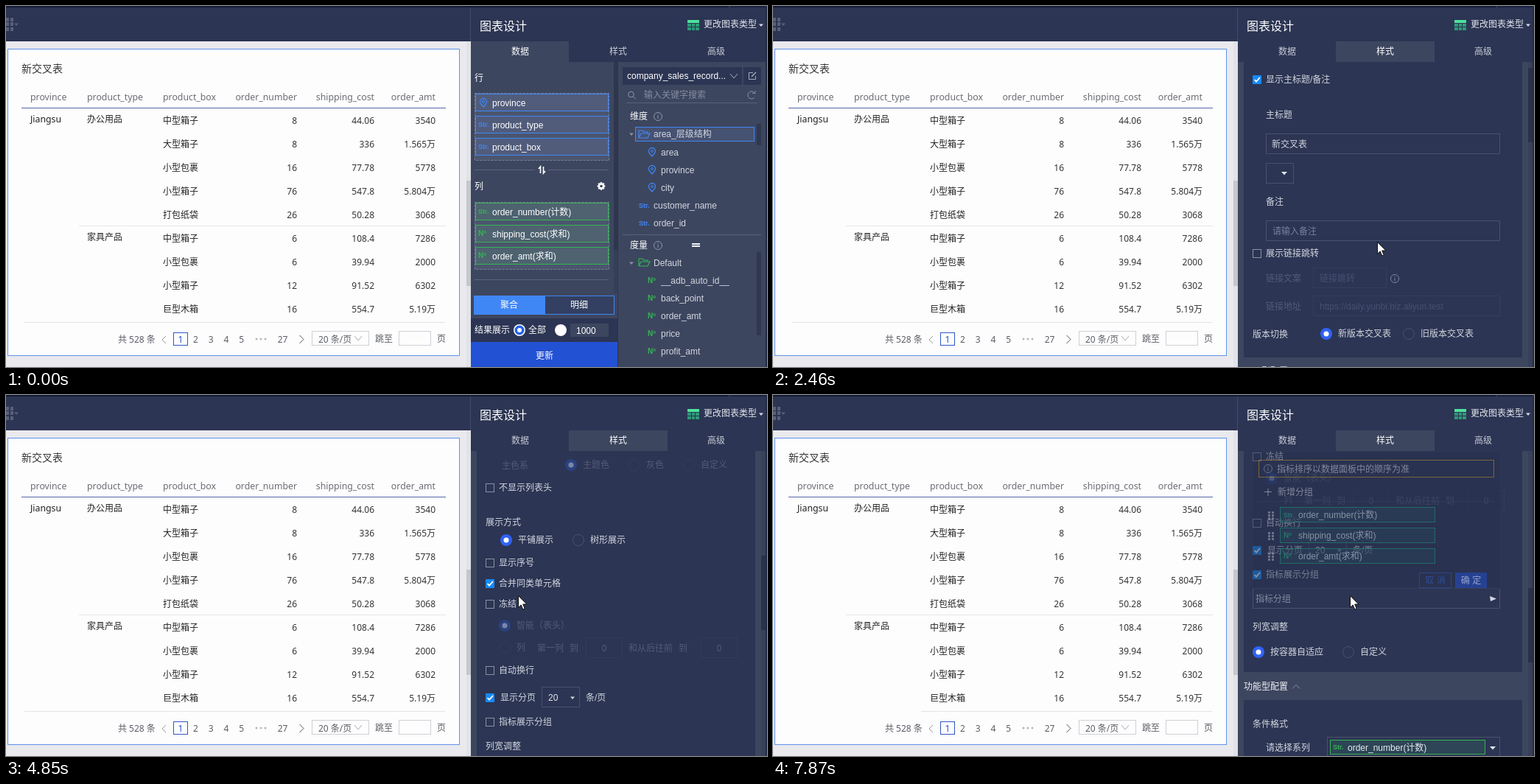
These frames come from a looping animation (1033x490 px, 8000 ms). An HTML page with a canvas:

```html
<!DOCTYPE html>
<html lang="zh-CN">
<head>
<meta charset="utf-8">
<title>图表设计</title>
<style>
html, body { margin: 0; width: 100%; height: 100%; overflow: hidden; background: #2c3553; }
canvas { display: block; width: 1033px; height: 490px; }
</style>
</head>
<body>
<canvas id="stage" width="1033" height="490"></canvas>
<script>
const ctx = document.getElementById('stage').getContext('2d');
const LOOP = 8000;
const UI = '"Liberation Sans", "Noto Sans CJK SC", "Noto Sans CJK", sans-serif';
const DOC = '"Noto Sans", "Noto Sans CJK SC", "Noto Sans CJK", sans-serif';
const NAVY = '#2c3553', SLATE = '#3d465f', BLUE = '#3f87f5', GREEN = '#34b552';
const SOFT = '#d3d7e0', DIM = '#525b76', EDGE = '#48516c';

// ---- drawing helpers ----
function text(s, x, y, color = SOFT, o = {}) {
  const size = o.size || 12;
  ctx.font = `${o.weight || 400} ${size}px ${o.font || UI}`;
  ctx.textAlign = o.align || 'left';
  ctx.fillStyle = color;
  ctx.fillText(s, x, Math.round(y + size * 0.36));
}
function fill(x, y, w, h, color) {
  ctx.fillStyle = color;
  ctx.fillRect(x, y, w, h);
}
function frame(x, y, w, h, color, bg) {
  if (bg) fill(x, y, w, h, bg);
  ctx.strokeStyle = color;
  ctx.lineWidth = 1;
  ctx.strokeRect(x + 0.5, y + 0.5, w - 1, h - 1);
}
function disc(x, y, r, color, line) {
  ctx.beginPath();
  ctx.arc(x, y, r, 0, 7);
  if (color) { ctx.fillStyle = color; ctx.fill(); }
  if (line) { ctx.strokeStyle = line; ctx.lineWidth = 1; ctx.stroke(); }
}
function path(pts, color, width = 1) {
  ctx.beginPath();
  for (let i = 0; i < pts.length; i += 2) ctx.lineTo(pts[i], pts[i + 1]);
  ctx.strokeStyle = color;
  ctx.lineWidth = width;
  ctx.stroke();
}
function shape(pts, color) {
  ctx.beginPath();
  for (let i = 0; i < pts.length; i += 2) ctx.lineTo(pts[i], pts[i + 1]);
  ctx.fillStyle = color;
  ctx.fill();
}
const down = (x, y, r, color) => shape([x - r, y - r / 2, x + r, y - r / 2, x, y + r / 2 + 0.5], color);
const chevron = (x, y, r, d, color) => path([x - r, y - d / 2, x, y + d / 2, x + r, y - d / 2], color);

// ---- icons and controls ----
function info(x, y, color = '#8f97aa') {
  disc(x, y, 5.5, null, color);
  fill(x - 0.5, y - 3, 1, 1, color);
  fill(x - 0.5, y - 1, 1, 4, color);
}
function pin(x, y) {
  ctx.beginPath();
  ctx.arc(x, y - 1, 4.5, Math.PI * 0.85, Math.PI * 0.15);
  ctx.lineTo(x, y + 6);
  ctx.closePath();
  ctx.strokeStyle = BLUE;
  ctx.lineWidth = 1.3;
  ctx.stroke();
  disc(x, y - 1, 1.5, null, BLUE);
}
function folder(x, y, color) {
  path([x - 7, y + 5, x - 7, y - 5, x - 2, y - 5, x, y - 3, x + 5, y - 3, x + 5, y - 1], color, 1.2);
  path([x - 7, y + 5, x - 4, y - 1, x + 8, y - 1, x + 5, y + 5, x - 7, y + 5], color, 1.2);
}
const tag = (kind, x, y, color) => text(kind, x, y - 0.5, color, { size: kind === 'Str.' ? 9 : 10, weight: 700 });
function check(y, on, label, x = 669) {
  if (on) {
    fill(651, y - 6, 12, 12, '#1689fa');
    path([653.5, y, 656, y + 2.7, 661, y - 3], '#fff', 1.8);
  } else frame(651, y - 6, 12, 12, '#8a91a4');
  text(label, x, y);
}
function radio(x, y, on, label, dim) {
  if (on) {
    disc(x, y, 8, dim ? '#2b427f' : '#2f63f6');
    disc(x, y, 3.5, dim ? '#7b86a8' : '#fff');
  } else disc(x, y, 7.5, null, dim ? '#343d5b' : '#48516d');
  text(label, x + 16, y, dim ? DIM : SOFT);
}
function section(y, label) {
  text(label, 639, y, '#f2f4f8', { weight: 500 });
  chevron(710, y, 5, -5, '#8790a5');
}

// ---- left page ----
const heads = [['province', 33], ['product_type', 110], ['product_box', 213],
  ['order_number', 395, 1], ['shipping_cost', 500, 1], ['order_amt', 583, 1]];
const rows = ['中型箱子 8 44.06 3540', '大型箱子 8 336 1.565万', '小型包裹 16 77.78 5778',
  '小型箱子 76 547.8 5.804万', '打包纸袋 26 50.28 3068', '中型箱子 6 108.4 7286',
  '小型包裹 6 39.94 2000', '小型箱子 12 91.52 6302', '巨型木箱 16 554.7 5.19万'];

function page(regrouped) {
  const doc = (s, x, y, color = '#333', align = 'left', size = 12) =>
    text(s, x, y, color, { font: DOC, align, size });
  fill(0, 48, 631, 442, '#e9e9ee');
  fill(625, 48, 6, 442, '#e2e3e8');
  fill(625, 237, 6, 143, '#c5c7cd');
  frame(2, 58, 614, 417, '#5f93ea', '#fdfdfe');
  doc('新交叉表', 21, 85, '#333', 'left', 14);
  for (const [s, x, right] of heads) doc(s, x, 124, '#6b6d74', right ? 'right' : 'left', 12.3);
  fill(21, 138, 576, 1, '#5666a6');
  doc('Jiangsu', 33, 154, '#222', 'left', 12.3);
  doc('办公用品', 110, 154, '#222');
  doc('家具产品', 110, 314, '#222');
  rows.forEach((row, i) => {
    const y = 156 + 32 * i, cells = row.split(' ');
    doc(cells[0], 213, y, '#222');
    [395, 500, 583].forEach((x, k) => doc(cells[k + 1], x, y, '#333', 'right'));
  });
  fill(99, 298, 498, 1, '#e6e6ea');
  const left = regrouped ? 201 : 25;
  fill(left, 429, 596 - left, 1, '#e3e3e7');

  const gray = '#5c5e66';
  doc('共 528 条', 152, 453, gray);
  path([217, 448, 212, 453, 217, 458], '#999');
  frame(227, 443, 20, 18, '#3156c8');
  doc('1', 237, 453, '#2450cc', 'center');
  ['2', '3', '4', '5'].forEach((n, i) => doc(n, 257.5 + i * 20.7, 453, gray, 'center'));
  for (const x of [340, 346, 352]) disc(x, 452, 1.5, '#b5b7be');
  doc('27', 375.5, 453, gray, 'center');
  path([398.5, 447, 404, 452.5, 398.5, 458], '#555');
  frame(415, 441, 78, 20, '#cfd0d6');
  doc('20 条/页', 424, 453, gray);
  chevron(478, 451, 5, 6, '#aaacb4');
  doc('跳至', 501, 452, gray);
  frame(533, 441, 44, 20, '#cfd0d6');
  doc('页', 585, 452, gray);
}

function header(tab) {
  fill(0, 0, 1033, 48, NAVY);
  fill(0, 0, 981, 2, '#131a33');
  fill(983, 0, 50, 2, '#1a2140');
  for (const y of [16, 22, 29]) {
    fill(0, y, 4, 5, '#596079');
    fill(6, y, 4, 5, '#596079');
  }
  down(14, 25, 3, '#596079');
  fill(631, 48, 402, 442, SLATE);
  fill(631, 48, 402, 28, NAVY);
  fill(631 + tab * 133, 48, tab ? 134 : 133, 28, SLATE);
  fill(630, 2, 1, 46, '#414a67');
  text('图表设计', 643, 27, '#fff', { size: 16 });
  fill(925, 19, 16, 14, '#2c9a78');
  fill(925, 19, 16, 4, '#4be29b');
  for (const y of [23, 28]) fill(925, y, 16, 1, NAVY);
  for (const x of [930, 935]) fill(x, 23, 1, 10, NAVY);
  text('更改图表类型', 947, 25, '#e3e6ed');
  down(1025, 26, 3, '#d9dce4');
  ['数据', '样式', '高级'].forEach((s, i) =>
    text(s, 698 + i * 133, 62, i === tab ? '#fff' : '#c9cdd8', { align: 'center', weight: i === tab ? 500 : 400 }));
}

// ---- data tab ----
function chips(y, color, bg, items) {
  fill(636, y, 183, 92, '#4b556e');
  ctx.setLineDash([3, 2]);
  frame(636, y, 183, 92, '#77809a');
  ctx.setLineDash([]);
  items.forEach(([kind, s], i) => {
    const top = y + 1 + i * 30, mid = top + 12;
    frame(637, top, 181, 24, color, bg);
    kind === 'pin' ? pin(648, mid) : tag(kind, 641, mid, color);
    text(s, 660, mid + 1, '#fff');
  });
}
function dataTab() {
  text('行', 636, 98, '#fff');
  fill(825, 76, 5, 314, '#363f58');
  fill(825, 76, 5, 255, '#2f374f');
  chips(118, BLUE, '#515c7b', [['pin', 'province'], ['Str.', 'product_type'], ['Str.', 'product_box']]);
  fill(636, 222, 82, 1, '#5b647b');
  fill(736, 222, 82, 1, '#5b647b');
  path([725.5, 227, 725.5, 218, 723, 221], '#fff', 1.6);
  path([729.5, 218, 729.5, 227, 732, 224], '#fff', 1.6);
  text('列', 636, 245, '#fff');
  for (let i = 0; i < 8; i++) {
    const a = i * Math.PI / 4;
    disc(808 + 4.2 * Math.cos(a), 244.5 + 4.2 * Math.sin(a), 1.3, '#fff');
  }
  disc(808, 244.5, 4.2, '#fff');
  disc(808, 244.5, 1.8, SLATE);
  chips(266, GREEN, '#4e6270', [['Str.', 'order_number(计数)'], ['Nº', 'shipping_cost(求和)'], ['Nº', 'order_amt(求和)']]);
  fill(636, 371, 182, 1, '#5b647b');
  fill(635, 393, 96, 26, BLUE);
  text('聚合', 683, 406, '#fff', { align: 'center' });
  frame(731, 393, 95, 26, BLUE, '#344061');
  text('明细', 778, 406, '#fff', { align: 'center' });
  fill(631, 424, 199, 32, NAVY);
  text('结果展示', 636, 440, '#fff');
  disc(697, 440, 8, '#fff');
  disc(697, 440, 6.5, '#2462e8');
  disc(697, 440, 3, '#fff');
  text('全部', 709, 440, '#fff');
  disc(753, 440, 8, '#fff');
  fill(766, 431, 52, 18, SLATE);
  text('1000', 774, 441, '#fff');
  fill(631, 456, 199, 34, '#2351d4');
  text('更新', 731, 475, '#fff', { align: 'center' });

  fill(830, 76, 1, 414, '#2c3450');
  fill(837, 83, 162, 24, NAVY);
  text('company_sales_record...', 843, 95, '#fff');
  chevron(988, 95, 5, 6, '#a7aebd');
  fill(1001, 83, 24, 24, NAVY);
  path([1014, 90.5, 1008.5, 90.5, 1008.5, 99.5, 1017.5, 99.5, 1017.5, 95], '#a7aebd');
  path([1012, 96, 1018, 90], '#a7aebd', 1.4);
  disc(848.5, 120, 3.8, null, '#8d95a8');
  path([851.5, 123, 855, 126.5], '#8d95a8');
  text('输入关键字搜索', 866, 121, '#858da1');
  ctx.beginPath();
  ctx.arc(1012, 121, 5, 0.7, 5.7);
  ctx.stroke();
  path([1013, 118.5, 1017, 118.5, 1017, 115], '#858da1');
  fill(842, 131, 178, 1, '#59627a');

  text('维度', 847, 150, '#fff', { weight: 500 });
  info(885, 150);
  frame(854, 164, 162, 20, BLUE, '#465272');
  down(849, 174, 3, '#8790a5');
  folder(866, 174, BLUE);
  text('area_层级结构', 879, 174);
  ['area', 'province', 'city'].forEach((s, i) => {
    pin(877, 198 + i * 24);
    text(s, 889, 199 + i * 24);
  });
  ['customer_name', 'order_id'].forEach((s, i) => {
    tag('Str.', 859, 271 + i * 24, BLUE);
    text(s, 879, 271 + i * 24);
  });
  fill(1019, 160, 6, 29, '#30384f');
  fill(837, 310, 188, 1, '#59627a');

  text('度量', 847, 325, '#fff', { weight: 500 });
  info(885, 325);
  fill(931, 322, 11, 2, '#f0f2f6');
  fill(931, 325, 11, 2, '#f0f2f6');
  down(849, 349, 3, '#8790a5');
  folder(866, 348, GREEN);
  text('Default', 879, 349);
  ['__adb_auto_id__', 'back_point', 'order_amt', 'price', 'profit_amt'].forEach((s, i) => {
    tag('Nº', 871, 373 + i * 24, GREEN);
    text(s, 889, 373 + i * 24);
  });
  fill(1019, 334, 6, 113, '#30384f');
}

// ---- style tab, laid out in scroll coordinates ----
function themes(y) {
  frame(683, y - 21, 54, 42, '#48526f');
  ['斑马线', '线框', '简版', '极简'].forEach((s, i) => {
    const x = 710 + i * 70;
    fill(x - 15, y - 10, 30, 20, '#29435f');
    fill(x - 13, y - 9, 26, 18, '#26486a');
    for (const k of [-8, -1, 6]) fill(x - 13, y + k, 26, i === 1 ? 1 : 2, i === 1 ? '#20567c' : '#2b6695');
    if (i === 1) for (const k of [-13, -4, 4, 12]) fill(x + k, y - 8, 1, 16, '#20567c');
    text(s, x, y + 32, '#66708a', { align: 'center' });
  });
}
function styleTab(scroll, grouped) {
  const add = grouped ? 38 : 0;
  ctx.save();
  ctx.beginPath();
  ctx.rect(631, 76, 402, 414);
  ctx.clip();
  ctx.save();
  ctx.translate(0, -Math.round(scroll));

  section(93, '基础信息');
  fill(639, 112, 378, 405, NAVY);
  check(140, true, '显示主标题/备注');
  text('主标题', 669, 188, SOFT, { weight: 500 });
  frame(669, 213, 318, 28, EDGE);
  text('新交叉表', 677, 228);
  frame(669, 253, 38, 28, EDGE);
  down(694, 267, 4, '#e0e3ea');
  text('备注', 669, 306);
  frame(669, 331, 318, 28, EDGE);
  text('请输入备注', 678, 346, '#78819a');
  check(376, false, '展示链接跳转');
  text('链接文案', 669, 410, DIM);
  frame(733, 395, 100, 28, '#353e5b');
  text('链接跳转', 742, 410, '#465070');
  info(844, 410, '#7f889d');
  text('链接地址', 669, 448, DIM);
  frame(733, 433, 254, 28, '#353e5b');
  text('https://daily.yunbi.biz.aliyun.test', 742, 448, '#465070');
  text('版本切换', 651, 486);
  radio(751, 485, true, '新版本交叉表');
  radio(863, 485, false, '旧版本交叉表');

  section(536, '展示型配置');
  fill(639, 555, 378, 583 + add, NAVY);
  check(583, false, '自定义表格主题');
  themes(623);
  text('主色系', 673, 696, DIM);
  radio(767, 695, true, '主题色', true);
  radio(853, 695, false, '灰色', true);
  radio(927, 695, false, '自定义', true);
  check(726, false, '不显示列表头');
  text('展示方式', 651, 773, SOFT, { weight: 500 });
  radio(679, 797, true, '平铺展示');
  radio(777, 797, false, '树形展示');
  check(828, false, '显示序号');
  check(856, true, '合并同类单元格');
  check(884, false, '冻结');
  radio(677, 913, true, '智能（表头）', true);
  radio(677, 943, false, '列', true);
  text('第一列', 721, 944, DIM);
  text('到', 765, 944, DIM);
  text('和从后往前', 845, 944, DIM);
  text('到', 913, 944, DIM);
  for (const x of [787, 943]) {
    frame(x, 929, 50, 28, '#323b58');
    text('0', x + 25, 944, DIM, { align: 'center' });
  }
  check(974, false, '自动换行');
  check(1011, true, '显示分页', 671);
  frame(727, 996, 52, 28, EDGE);
  text('20', 736, 1011, '#e0e3ea');
  down(769, 1011, 3, '#d3d7e0');
  text('条/页', 787, 1011);
  check(1044, grouped, '指标展示分组');
  if (grouped) {
    frame(651, 1062, 336, 28, EDGE);
    text('指标分组', 655, 1077, '#858da3');
    shape([973, 1073, 982, 1076.5, 974, 1080], '#d3d7e0');
  }

  ctx.translate(0, add);
  text('列宽调整', 651, 1077);
  radio(659, 1111, true, '按容器自适应');
  radio(781, 1111, false, '自定义');
  section(1158, '功能型配置');
  fill(639, 1176, 378, 400, NAVY);
  text('条件格式', 651, 1209);
  text('请选择系列', 669, 1241);
  frame(752, 1226, 235, 28, EDGE);
  frame(756, 1230, 211, 20, GREEN, '#2d4556');
  tag('Str.', 760, 1240, GREEN);
  text('order_number(计数)', 780, 1241, '#e8ebf0');
  down(977, 1241, 4, '#e0e3ea');
  ctx.restore();

  fill(1025, 76, 6, 414, '#394159');
  fill(1025, Math.round(74 + scroll * 0.24 - (grouped ? 4 : 0)), 6, 101, '#2a324a');
  ctx.restore();
}

function groupMenu() {
  ctx.save();
  ctx.globalAlpha = 0.52;
  fill(651, 78, 336, 185, '#28304d');
  frame(659, 88, 320, 24, '#c8952f');
  info(672, 100, '#a7aebd');
  text('指标排序以数据面板中的顺序为准', 684, 101);
  fill(667, 131, 10, 1, SOFT);
  fill(671.5, 127, 1, 10, SOFT);
  text('新增分组', 685, 132);
  fill(659, 144, 320, 1, '#39425f');
  [['Str.', 'order_number(计数)'], ['Nº', 'shipping_cost(求和)'], ['Nº', 'order_amt(求和)']].forEach(([kind, s], i) => {
    const y = 163 + i * 28;
    for (const dx of [0, 5]) for (const dy of [-5, -1, 3]) fill(672 + dx, y + dy, 3, 3, '#a7aebd');
    frame(688, y - 11, 211, 21, '#1c9a78', '#29425a');
    tag(kind, 693, y, '#2ba77e');
    text(s, 713, y, '#e0e3ea');
  });
  frame(877, 241, 44, 21, '#2f57bd');
  text('取 消', 899, 252, '#3566d6', { align: 'center' });
  fill(926, 241, 43, 21, '#2350d0');
  text('确 定', 947.5, 252, '#fff', { align: 'center' });
  ctx.restore();
}

// ---- pointer ----
function outline(d) {
  const p = new Path2D(d);
  ctx.lineJoin = 'round';
  ctx.fillStyle = '#fff';
  ctx.strokeStyle = '#111';
  ctx.lineWidth = 1;
  ctx.fill(p);
  ctx.stroke(p);
}
const pointers = {
  arrow: () => outline('M.5 .5V16.5L4.2 13L6.8 19L9.2 18L6.7 12H11.8Z'),
  hand: () => outline('M-1.5 2Q0 -1 1.5 2V8Q4 6.5 4.5 8.5Q7 7.2 7.3 9.5Q10 8.8 10 11.5V15Q10 18 8 19.5V22H-1V20Q-3 17.5-5.3 13.5Q-6 11-4 11Q-2.5 11.5-1.5 13.5Z'),
  banned() {
    disc(0, 0, 7.5, '#fff');
    ctx.beginPath();
    ctx.arc(0, 0, 6, 0, 7);
    ctx.strokeStyle = '#d8141c';
    ctx.lineWidth = 2.4;
    ctx.stroke();
    path([-4, -4, 4, 4], '#d8141c', 2.4);
  }
};

// ---- timeline: start, end, steps, then the end value ----
const scrollMoves = [[2460, 2460, 1, 40], [2610, 2730, 2, 200], [2980, 3340, 4, 400],
  [3650, 3780, 2, 600], [6600, 7080, 5, 700], [7230, 7470, 3, 800]];
const pointerMoves = [
  [400, 880, 5, 846, 89, 'arrow'], [1000, 1000, 1, 843, 61, 'hand'],
  [1980, 2340, 4, 820, 320, 'arrow'], [3340, 3340, 1, 819, 319, 'banned'],
  [3920, 4040, 2, 690, 274, 'hand'], [4190, 4190, 1, 687, 258, 'hand'],
  [4310, 4430, 2, 692, 270, 'hand'], [4580, 4700, 2, 695, 272, 'arrow'],
  [4970, 4970, 1, 695, 286, 'arrow'], [5120, 5480, 4, 696, 411, 'hand'],
  [5630, 5750, 2, 699, 437, 'hand'], [6600, 6960, 4, 784, 273, 'hand'],
  [7620, 7620, 1, 783, 272, 'arrow']];

// stepped moves advance by the same share at each step
function progress(t, a, b, n) {
  if (t < a) return 0;
  if (t >= b) return 1;
  return (1 + Math.floor((t - a) / (b - a) * (n - 1) + 1e-6)) / n;
}
function scrollAt(t) {
  return scrollMoves.reduce((v, [a, b, n, to]) => v + (to - v) * progress(t, a, b, n), 0);
}
function drawPointer(t) {
  let x = 873, y = 221, kind = null;
  for (const [a, b, n, tx, ty, k] of pointerMoves) {
    const p = progress(t, a, b, n);
    if (!p) break;
    x += (tx - x) * p;
    y += (ty - y) * p;
    kind = k;
  }
  if (!kind) return;
  ctx.save();
  ctx.translate(Math.round(x), Math.round(y));
  pointers[kind]();
  ctx.restore();
}

function draw(t) {
  const styled = t >= 1710;
  header(styled ? 1 : 0);
  page(t >= 6450);
  if (styled) styleTab(scrollAt(t), t >= 6330);
  else dataTab();
  if (t >= 7870) groupMenu();
  fill(1031, 0, 2, 490, '#232b45');
  drawPointer(t);
}

const start = performance.now();
function tick() {
  draw((performance.now() - start) % LOOP);
  requestAnimationFrame(tick);
}
tick();
</script>
</body>
</html>
```
